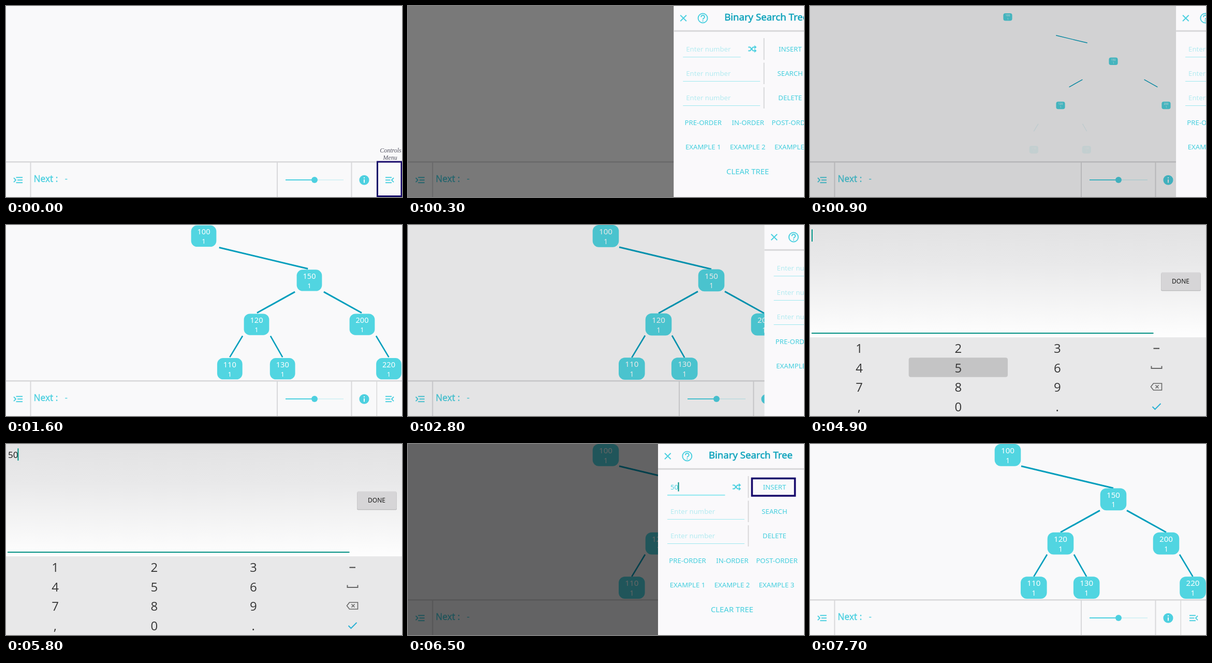
These frames come from a looping animation (765 px wide and 369 px high, 8000 ms). An HTML page:

```html
<!DOCTYPE html>
<html lang="en">
<head>
<meta charset="utf-8">
<title>Binary Search Tree</title>
<style>
html, body { margin: 0; width: 100%; height: 100%; overflow: hidden; background: #f9f9fa; }
svg { display: block; width: 100vw; height: 100vh; font-family: "Noto Sans", sans-serif; }
.mid { text-anchor: middle; }
.ui { fill: #45cfde; font-size: 13.2px; }
.hint { fill: #b4ebf1; font-size: 13.2px; }
.icon { fill: none; stroke: #4dd0e0; stroke-width: 2; }
.rule { fill: none; stroke: #d8d8da; }
.mark { fill: none; stroke: #17086b; }
.key { font: 24px "Open Sans", sans-serif; font-stretch: 80%; fill: #363636; }
</style>
</head>
<body>
<svg id="stage" viewBox="0 0 765 369" preserveAspectRatio="none">
  <defs>
    <linearGradient id="sheet" x2="0" y2="1">
      <stop offset="0" stop-color="#e2e2e3"/>
      <stop offset=".35" stop-color="#e9e9ea"/>
      <stop offset="1" stop-color="#fefefe"/>
    </linearGradient>
  </defs>
  <rect width="765" height="369" fill="#f9f9fa"/>
  <g id="tree"></g>

  <g id="bar">
    <rect y="302" width="765" height="67" fill="#f9f9fa"/>
    <path class="rule" stroke-width="2.6" d="M0 301.3H765"/>
    <path class="rule" stroke-width="2" d="M47.5 302V369M524 302V369M667.5 302V369"/>
    <path class="rule" stroke-width="1.5" d="M716.3 302V369"/>
    <path class="icon" d="M15 332l4 4.2-4 4.2M19.5 331.3H32M22 336.3H32M19.5 341.3H32"/>
    <path class="icon" d="M749 332l-4 4.2 4 4.2M733 331.3H745M733 336.3H742.500M733 341.3H745"/>
    <text x="53.500" y="340" font-size="17.2" fill="#4dd0e0" stroke="#4dd0e0" stroke-width=".4">Next :</text>
    <text x="113.500" y="340" font-size="17.2" fill="#4dd0e0">-</text>
    <path class="icon" d="M540 336H596"/>
    <path class="icon" style="stroke:#d8f2f5" d="M596 336H652"/>
    <circle cx="596" cy="336" r="6" fill="#4dd0e0"/>
    <circle cx="692" cy="336.300" r="9.500" fill="#4dd0e0"/>
    <path d="M692 335V341.500M692 331V333" stroke="#f9f9fa" stroke-width="2"/>
  </g>

  <g id="menuMark">
    <rect class="mark" stroke-width="3" x="717.500" y="301" width="46.500" height="66.500"/>
    <g class="mid" font-family="Liberation Serif, serif" font-style="italic" font-size="12" fill="#555563">
      <text x="743" y="282.500">Controls</text>
      <text x="742" y="296.500">Menu</text>
    </g>
  </g>
  <rect id="dim" width="765" height="369"/>

  <g id="panel">
    <rect x="483" width="282" height="369" fill="#faf9fb"/>
    <path class="rule" stroke-width="3" d="M483 48.300H765"/>
    <path class="icon" d="M496 17.700l11.600 11.600M507.600 17.700L496 29.300"/>
    <circle class="icon" cx="539.300" cy="23.500" r="9"/>
    <path class="icon" stroke-linejoin="round" d="M536 21.500c0-4.600 6.700-4.600 6.700 0 0 2.300-3.300 2.300-3.300 4.800M539.400 27.700v2"/>
    <text class="mid" x="662" y="28.300" font-size="18.600" fill="#0fa3bc" stroke="#0fa3bc" stroke-width=".55">Binary Search Tree</text>
    <path id="line1" fill="none" d="M501 98.700H612.500"/>
    <path fill="none" stroke="#9de8ef" d="M501 145.500H650M501 192.500H650"/>
    <path class="icon" d="M627 79.500h3.500l6 7h3M627 86.500h3.500l6-7h3"/>
    <path fill="#4dd0e0" d="M639 75.800l4.300 3.700-4.300 3.700zM639 82.800l4.300 3.700-4.300 3.700z"/>
    <path class="rule" stroke-width="2" d="M657.500 62V104M657.500 109.500V151M657.500 157V198"/>
    <text id="field" x="507" y="87.700"></text>
    <text class="hint" x="507" y="134.700">Enter number</text>
    <text class="hint" x="507" y="181.700">Enter number</text>
    <g id="labels" class="ui mid"></g>
    <text class="mid" x="626" y="324.700" font-size="14.900" fill="#45cfde">CLEAR TREE</text>
    <rect id="caret" y="74" width="2" height="17.500" fill="#008f85"/>
    <rect id="insertMark" class="mark" stroke-width="3.600" x="664.500" y="66.500" width="83" height="33.500"/>
  </g>

  <g id="editor">
    <rect id="paper" width="765" fill="url(#sheet)"/>
    <text id="typed" x="4" y="27" font-size="17" fill="#222"></text>
    <rect id="bigCaret" y="8.500" width="2" height="23.500" fill="#009688"/>
    <path id="under" d="M3 0H663.500" stroke="#009083" stroke-width="2"/>
    <g id="done">
      <rect x="678" y="-16" width="77" height="35" rx="2.500" fill="#bdbdbf"/>
      <rect id="doneFace" x="678.500" y="-17" width="76" height="34.500" rx="2"/>
      <text class="mid" x="716" y="4.700" font-size="12" fill="#1c1c1c">DONE</text>
    </g>
  </g>

  <g id="pad">
    <rect y="217" width="765" height="152" fill="#e8e8e9"/>
    <rect id="press" x="190.700" width="191.300" height="37.500" rx="4" fill="#c4c4c5"/>
    <g id="keys" class="key mid"></g>
    <g fill="none" stroke="#666" stroke-width="1.600">
      <path stroke="#444" stroke-width="2" d="M663.500 238.500H675"/>
      <path stroke-width="2" d="M659.500 272.500V277H679.500V272.500"/>
      <path d="M658.500 312.500l5-6.500H679.500V319H663.500zM667.500 309.500l6 6M673.500 309.500l-6 6"/>
      <path stroke="#27b0d4" stroke-width="2" d="M661.500 351l5 5L677.500 345"/>
    </g>
  </g>
</svg>
<script>
const LOOP = 8000, STEP = 100;
const NS = "http://www.w3.org/2000/svg";
const $ = id => document.getElementById(id);

function add(parent, tag, attrs, text) {
  const el = document.createElementNS(NS, tag);
  set(el, attrs);
  if (text !== undefined) el.textContent = text;
  return parent.appendChild(el);
}
function set(el, attrs) {
  for (const k in attrs) el.setAttribute(k, attrs[k]);
}
const show = (el, on) => set(el, { visibility: on ? "visible" : "hidden" });
const move = (el, x, y) => set(el, { transform: `translate(${x} ${y})` });
const ramp = (t, start, span) => Math.min(1, Math.max(0, (t - start) / span));
const easeOut = x => 1 - (1 - x) ** 3;
const smooth = x => x * x * (3 - 2 * x);
const within = (t, a, b) => t >= a && t < b;

// value, x, y, level, parent index
const nodes = [
  [100, 382, 21.3, 0], [150, 586, 106.8, 1, 0], [120, 484, 192, 2, 1], [200, 688, 192, 2, 1],
  [110, 432.3, 277.6, 3, 2], [130, 534.2, 277.6, 3, 2], [220, 739.5, 277.6, 3, 3]
].map(([value, x, y, level, up]) => ({ value, x, y, level, up }));

for (const n of nodes) {
  n.group = add($("tree"), "g", {});
  if (n.level) n.edge = add(n.group, "line", { stroke: "#069fbd" });
  n.box = add(n.group, "g", { class: "mid", fill: "#fff" });
  add(n.box, "rect", { x: -25.3, y: -21.3, width: 50.6, height: 42.8, rx: 12, fill: "#51d5e1" });
  add(n.box, "text", { y: -3.2, "font-size": 15.2 }, n.value);
  add(n.box, "text", { y: 15.7, "font-size": 13.5 }, 1);
}

[["INSERT", 708, 0], ["SEARCH", 708, 1], ["DELETE", 708, 2],
 ["PRE-ORDER", 540, 3], ["IN-ORDER", 626.5, 3], ["POST-ORDER", 712.5, 3],
 ["EXAMPLE 1", 540, 4], ["EXAMPLE 2", 626, 4], ["EXAMPLE 3", 712, 4]
].forEach(([s, x, row]) => add($("labels"), "text", { x, y: 87.9 + row * 47.2 }, s));

[..."123456789,0."].forEach((s, i) =>
  add($("keys"), "text", { x: 95 + i % 3 * 191.4, y: 247 + Math.floor(i / 3) * 37.6 }, s));

function drawTree(t) {
  const s = 0.34 + 0.66 * smooth(ramp(t, 1000, 700));
  for (const n of nodes) {
    set(n.group, { opacity: ramp(t, 620 + 90 * n.level, 100) });
    set(n.box, { transform: `translate(${n.x} ${n.y}) scale(${s})` });
    if (!n.edge) continue;
    const p = nodes[n.up], side = Math.sign(n.x - p.x);
    const x1 = p.x + side * 26, y1 = p.y + 21.5, x2 = n.x, y2 = n.y - 21.5;
    const cx = (x1 + x2) / 2 + side * 8.5 * (1 - s) / 0.66, cy = (y1 + y2) / 2;
    const dx = (x2 - x1) / 2 * s, dy = (y2 - y1) / 2 * s;
    set(n.edge, {
      x1: cx - dx, y1: cy - dy, x2: cx + dx, y2: cy + dy,
      "stroke-width": 0.6 + (n.level === 3 ? 2.1 : 2.5) * s
    });
  }
}

const drawer = t => [[90, 1], [736, -1], [2760, 1], [7200, -1]]
  .reduce((sum, [start, dir]) => sum + dir * easeOut(ramp(t, start, 400)), 0);

function drawPanel(t) {
  const open = drawer(t), focus = t >= 3300, filled = t >= 6000;
  move($("panel"), 282 * (1 - open), 0);
  show($("panel"), open > 0.001);
  set($("dim"), { opacity: 0.6 * drawer(t - 20) });
  show($("menuMark"), t < 100);
  set($("line1"), { stroke: focus ? "#8ce8ef" : "#9de8ef", "stroke-width": focus ? 2 : 1 });
  $("field").textContent = filled ? "50" : "Enter number";
  set($("field"), { class: filled ? "ui" : "hint" });
  set($("caret"), { x: filled ? 521.5 : 507 });
  show($("caret"), focus && open > 0.001 && !within(t, 6900, 7000));
  show($("insertMark"), within(t, 6400, 6800));
}

function drawEditor(t) {
  const y = 369 * (1 - easeOut(ramp(t, 3505, 280)) + ramp(t, 5950, 300) ** 2);
  const padY = 152 * (1 - easeOut(ramp(t, 3700, 200)) + smooth(ramp(t, 5950, 200)));
  const h = 217 + padY;
  const text = t < 5000 ? "" : t < 5400 ? "5" : "50";
  move($("editor"), 0, y);
  set($("paper"), { height: h });
  $("typed").textContent = text;
  set($("bigCaret"), { x: 3 + text.length * 9.7 });
  show($("bigCaret"), !within(t, 4400, 4600));
  move($("under"), 0, h - 8);
  move($("done"), 0, h / 2);
  set($("doneFace"), { fill: within(t, 5600, 5800) ? "#b8b8ba" : "#d6d5d7" });

  move($("pad"), 0, padY);
  const five = within(t, 4900, 5100);
  show($("press"), five || within(t, 5300, 5400));
  set($("press"), { y: five ? 256.3 : 331.5 });
}

function frame(now) {
  const t = Math.floor((now + 15) / STEP) * STEP % LOOP;
  drawTree(t);
  drawPanel(t);
  drawEditor(t);
}

let began;
function tick(now) {
  began ??= now;
  frame(now - began);
  requestAnimationFrame(tick);
}
frame(0);
requestAnimationFrame(tick);
</script>
</body>
</html>
```
